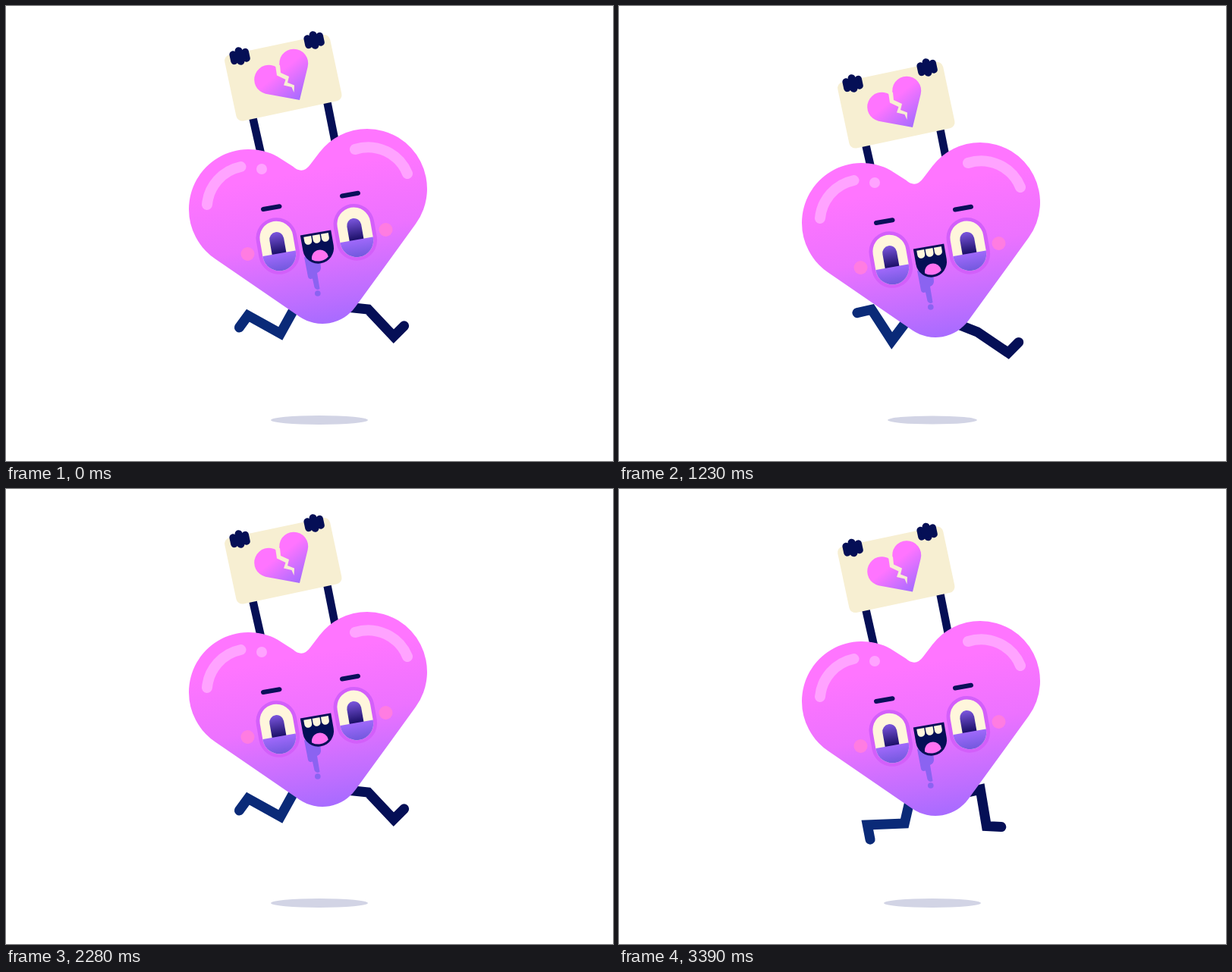
These frames come from a looping animation (800 by 600 pixels, 3.42 s). An HTML page:

```html
<!DOCTYPE html>
<html lang="en">
<head>
<meta charset="utf-8">
<title>Running heart</title>
<style>
  html, body { margin: 0; width: 100%; height: 100%; overflow: hidden; background: #fff; }
  svg { display: block; width: 800px; height: 600px; }
  .leg { fill: none; stroke-width: 13; stroke-linecap: round; stroke-linejoin: miter; stroke-miterlimit: 6; }
  .ink { fill: #050f56; }
  .arm { stroke: #050f56; stroke-width: 10.5; }
  .brow { stroke: #0a0f5a; stroke-width: 6; stroke-linecap: round; }
  .shine { fill: none; stroke: #ffa3ff; stroke-width: 14; stroke-linecap: round; }
  .cream { fill: #fff6dc; }
</style>
</head>
<body>
<svg viewBox="0 0 800 600" xmlns="http://www.w3.org/2000/svg">
  <defs>
    <linearGradient id="skin" gradientUnits="userSpaceOnUse" x1="375" y1="170" x2="421" y2="420">
      <stop offset=".2" stop-color="#ff75ff"/>
      <stop offset=".55" stop-color="#ec72ff"/>
      <stop offset=".85" stop-color="#bf6eff"/>
      <stop offset="1" stop-color="#a76bff"/>
    </linearGradient>
    <linearGradient id="mini" gradientUnits="userSpaceOnUse" x1="347" y1="74" x2="387" y2="124">
      <stop offset=".3" stop-color="#ff74ff"/>
      <stop offset="1" stop-color="#a56bff"/>
    </linearGradient>
    <linearGradient id="lid" gradientUnits="userSpaceOnUse" x1="0" y1="10" x2="0" y2="34">
      <stop offset="0" stop-color="#a069fb"/>
      <stop offset="1" stop-color="#7058dc"/>
    </linearGradient>
    <linearGradient id="pupil" gradientUnits="userSpaceOnUse" x1="0" y1="-18" x2="0" y2="10">
      <stop offset="0" stop-color="#7a55dc"/>
      <stop offset="1" stop-color="#1b1068"/>
    </linearGradient>
    <clipPath id="ball"><rect x="-22" y="-33" width="44" height="66" rx="22"/></clipPath>
    <g id="eye" transform="rotate(-10)">
      <rect x="-27" y="-37.5" width="54" height="75" rx="27" fill="#d35ffa"/>
      <g clip-path="url(#ball)">
        <rect class="cream" x="-23" y="-34" width="46" height="68"/>
        <rect x="-9.5" y="-18.5" width="19" height="40" rx="9.5" fill="url(#pupil)"/>
        <rect x="-23" y="10" width="46" height="26" fill="url(#lid)"/>
      </g>
    </g>
    <g id="hand" class="ink" transform="rotate(-12)">
      <rect x="-13" y="-8.5" width="9.5" height="18" rx="4.5"/>
      <rect x="3.5" y="-8.5" width="9.5" height="18" rx="4.5"/>
      <rect x="-5" y="-12" width="10" height="24" rx="5"/>
      <rect x="-8" y="-7" width="16" height="15"/>
    </g>
    <path id="tooth" class="cream" d="M-5 3H5V9A5 5 0 0 1-5 9Z"/>
  </defs>

  <ellipse id="shadow" rx="64" ry="6" fill="#d2d4e5"/>
  <path id="far" class="leg" stroke="#050f56"/>
  <path id="near" class="leg" stroke="#0a2a78"/>

  <g id="sign">
    <path class="arm" d="M322.5 135L339 208M421 115L437 195"/>
    <rect x="-71" y="-44.5" width="142" height="89" rx="8" fill="#f7efd2" transform="translate(365.3 94.8) rotate(-12)"/>
    <path fill="url(#mini)" d="M387 124L342 115.7A19.2 19.2 0 1 1 357 81L361 81A19 19 0 1 1 397.6 80.5Z"/>
    <path fill="#f7efd2" d="M355 78L361 78L362 88L373 93L371 101L380 104.5L379.5 114L376.5 107L366 104.5L368.5 97L357 91.5Z"/>
    <use href="#hand" x="308" y="66"/>
    <use href="#hand" x="406" y="45"/>
  </g>

  <g id="heart">
    <path fill="url(#skin)" d="M275.4 333.2A79 79 0 0 1 241 268A79 79 0 0 1 358 198.700L378 211.500Q391 223 401 209L413 193.300A79 79 0 0 1 476 162A79 79 0 0 1 540 287.300L460.700 396.600A54 54 0 0 1 386.500 409.600Z"/>
    <path class="shine" d="M265 262A56 56 0 0 1 309.500 212M460 189A56 56 0 0 1 529 221"/>
    <circle cx="337" cy="215" r="7" fill="#ffa3ff"/>
    <path class="brow" d="M339 268L360.500 264.200M443 250.500L464 246.800"/>
    <circle cx="318.500" cy="327" r="9" fill="#ff7ce2"/>
    <circle cx="500.500" cy="295" r="9" fill="#ff7ce2"/>
    <use href="#eye" x="358.300" y="316.500"/>
    <use href="#eye" x="460.300" y="298.300"/>
    <g fill="#8b63f1">
      <path d="M393 331L398 357Q399 361 404 359.500L406.500 371Q408.500 375.500 413.500 373L410 352Q415 350 415 345L414 335Z"/>
      <circle cx="410.800" cy="379" r="3.800"/>
    </g>
    <g transform="translate(408 299) rotate(-10)">
      <path class="ink" d="M-20.500 0H20.500V20.500A20.500 20.500 0 0 1-20.500 20.500Z"/>
      <use href="#tooth" x="-11.500"/>
      <use href="#tooth"/>
      <use href="#tooth" x="11.500"/>
      <path fill="#ff72f2" d="M-11 34A11 11 0 0 1 11 34A17.500 17.500 0 0 1-11 34Z"/>
    </g>
  </g>
</svg>
<script>
const STEP = 285, CYCLE = 2 * STEP, TICK = 30;

// Periodic monotone cubic through [time, value] keys.
function track(period, keys) {
  const n = keys.length;
  const at = i => {
    const k = keys[(i + n) % n];
    return [k[0] + period * Math.floor(i / n), k[1]];
  };
  const slope = i => (at(i + 1)[1] - at(i)[1]) / (at(i + 1)[0] - at(i)[0]);
  const tangent = i => {
    const a = slope(i - 1), b = slope(i);
    return a * b > 0 ? 2 * a * b / (a + b) : 0;
  };
  return time => {
    const t = ((time % period) + period) % period;
    let i = n - 1;
    while (keys[i][0] > t) i--;
    const [t0, v0] = at(i), [t1, v1] = at(i + 1);
    const h = t1 - t0, s = (t - t0) / h, r = 1 - s;
    return v0 * (1 + 2 * s) * r * r + tangent(i) * h * s * r * r
         + v1 * s * s * (3 - 2 * s) - tangent(i + 1) * h * s * s * r;
  };
}

const bodyY = track(STEP, [[0, 0], [30, -4], [60, 3], [90, 18], [165, 48], [195, 70], [255, 12]]);
const signY = track(STEP, [[0, 0], [30, -8], [60, 10], [90, 36], [165, 87], [195, 94], [255, 11.5]]);
const shade = track(STEP, [[0, 1], [30, 1], [90, .92], [165, .735], [195, .69], [255, 1]]);

// time, thigh length, then the angles of thigh, shin and foot
const stride = [
  [0, 49, 119, 209, 126],
  [90, 43, 127, 237, 167],
  [165, 50, 125, 239, 153],
  [195, 42.5, 114, 237, 200],
  [255, 48, -13, 80.5, 3],
  [285, 48, 6, 46.6, -45],
  [375, 46, 21.5, 34, -45],
  [450, 49, 63, 61, -38],
  [480, 44, 55, 137, 2],
  [540, 41, 103, 177.6, 79]
];
const [thighLen, thigh, shin, foot] = [1, 2, 3, 4].map(c => track(CYCLE, stride.map(k => [k[0], k[c]])));

const el = id => document.getElementById(id);
const shift = (id, y) => el(id).setAttribute('transform', `translate(0 ${y})`);

function drawLeg(id, x, y, t) {
  let d = `M${x} ${y}`;
  for (const [len, deg] of [[thighLen(t), thigh(t)], [49, shin(t)], [19.5, foot(t)]]) {
    const a = deg * Math.PI / 180;
    x += len * Math.cos(a);
    y += len * Math.sin(a);
    d += `L${x.toFixed(2)} ${y.toFixed(2)}`;
  }
  el(id).setAttribute('d', d);
}

function draw(t) {
  const y = bodyY(t);
  shift('heart', y);
  shift('sign', signY(t));
  drawLeg('near', 385.5, 389 + y, t);
  drawLeg('far', 429.5, 395 + y, t + STEP);
  el('shadow').setAttribute('transform', `translate(413 546) scale(${shade(t)})`);
}

const start = performance.now();
function loop() {
  const t = performance.now() - start;
  draw(Math.floor((t + 1) / TICK) * TICK % CYCLE);
  requestAnimationFrame(loop);
}
loop();
</script>
</body>
</html>
```
